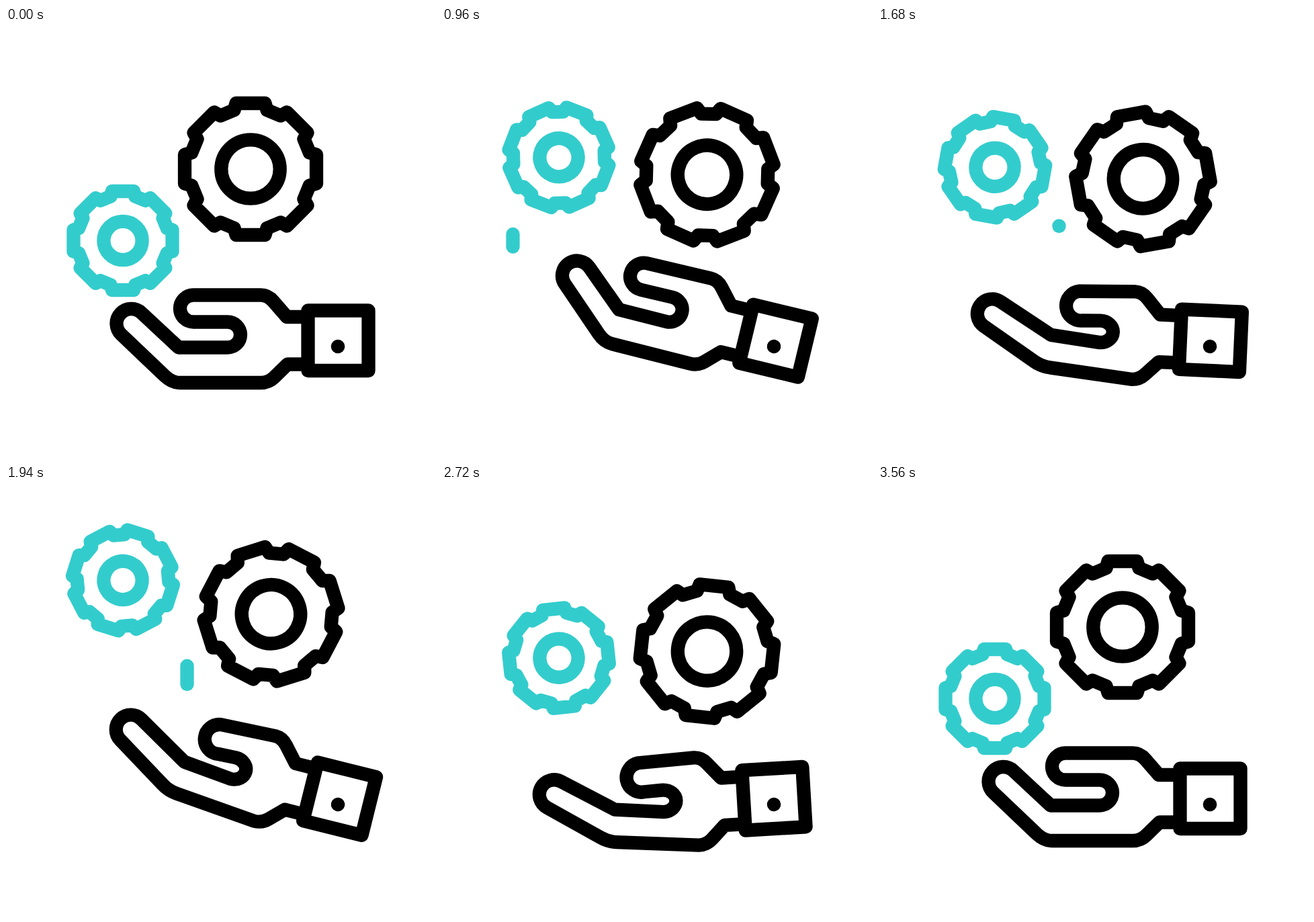
Recreate the animation shown at these times as an HTML page. Size 640x640 px, loop 3.6 s.

```html
<!DOCTYPE html>
<html lang="en">
<head>
<meta charset="utf-8">
<title>Hand and gears</title>
<style>
  html, body { margin: 0; width: 100%; height: 100%; overflow: hidden; background: #fff; }
  svg { display: block; width: 100vw; height: 100vh; }
  .line { fill: none; stroke: #000; stroke-width: 20.3; stroke-linejoin: round; }
  .cyan { stroke: #33cccc; }
  .streak { stroke-linecap: round; }
</style>
</head>
<body>
<svg viewBox="0 0 640 640">
  <g id="big" class="line">
    <path/><circle r="43.7"/>
  </g>
  <g id="small" class="line cyan">
    <path/><circle r="28.6"/>
  </g>
  <path id="streakA" class="line cyan streak"/>
  <path id="streakB" class="line cyan streak"/>
  <g id="arm" class="line">
    <path id="hand"/>
    <rect x="449.5" y="420.5" width="90" height="89.5"/>
    <circle cx="494" cy="474" r="10.3" fill="#000" stroke="none"/>
  </g>
</svg>
<script>
const LOOP = 3600;
const $ = id => document.getElementById(id);
const mix = (a, b, k) => a + (b - a) * k;
const ramp = (t, from, to) => Math.min(1, Math.max(0, (t - from) / (to - from)));
const ease = (t, from, to) => (1 - Math.cos(Math.PI * ramp(t, from, to))) / 2;

// Rest, then three tosses (top, bottom, top ...), then rest; the tops hang briefly.
const HANG = 40;
function toss(times, values) {
  return t => values.reduce((v, next, i) => {
    const from = times[i - 1] + (i % 2 ? 0 : HANG);
    return mix(v, next, ease(t, from, times[i]));
  });
}

const gearTimes = [200, 800, 1430, 1960, 2620, 3100, 3560];
const smallY = toss(gearTimes, [316.5, 185, 263.5, 140, 267, 162, 316.5]);
const bigY = toss(gearTimes, [210, 214.5, 253.5, 190.5, 251, 203, 210]);
const tilt = toss([200, 870, 1430, 1960, 2560, 3100, 3440], [0, 14, -7, 14, -6, 7, 0]);
const bigX = t => 364 + 30.5 * (ease(t, 200, 640) - ease(t, 3140, 3520));
const spin = t => 180 * (ramp(t, 200, 1400) + ramp(t, 1440, 2680)) + 135 * ramp(t, 2680, 3560);
const opening = t => ease(t, 850, 1360) - ease(t, 2660, 3400);

// The fingers stretch out and the thumb draws back as the hand opens.
function handPath(open) {
  const m = (a, b) => mix(a, b, open);
  const thumbX = m(279, 296.5), thumbY = m(417.5, 420.5), lip = m(437.5, 443);
  const tipX = m(186.5, 168), tipY = 440, angle = m(43, 32) * Math.PI / 180;
  const nx = 22 * Math.sin(angle), ny = 22 * Math.cos(angle);
  return `M449.5 430H418L398 407Q390 397.5 379 397.5
    L${thumbX} ${thumbY - 20}A20 20 0 0 0 ${thumbX + 6 * open} ${m(437.5, 444)}
    L330 ${lip}A19 ${(475.5 - lip) / 2} 0 0 1 330 475.5
    L257 ${m(475.5, 467.5)}L${tipX + nx} ${tipY - ny}A22 22 0 0 0 ${tipX - nx} ${tipY + ny}
    L${m(236.5, 234)} ${m(518, 508)}Q${m(247, 244)} ${m(528, 514.5)} ${m(259, 257)} ${m(528, 516)}
    L379 528Q391 528 399 520L419 500.5H449.5`;
}

function gearPath(size) {
  const tooth = [[-24.5, -87.8], [-21.5, -98], [21.5, -98], [24.5, -87.8]];
  const points = [];
  for (let k = 0; k < 8; k++) {
    const c = size * Math.cos(k * Math.PI / 4), s = size * Math.sin(k * Math.PI / 4);
    for (const [x, y] of tooth) points.push([x * c - y * s, x * s + y * c]);
  }
  return 'M' + points.join('L') + 'Z';
}

function place(id, x, y, angle) {
  $(id).setAttribute('transform', `translate(${x} ${y}) rotate(${angle})`);
}

// A vertical dash that grows upwards, then is wiped from below.
function streak(id, x, y, t, start) {
  const head = ramp(t, start, start + 300), tail = ramp(t, start + 385, start + 685);
  const shown = head > 0 && tail < 1;
  $(id).setAttribute('d', shown ? `M${x} ${y - 31 * tail}L${x} ${y - 31 * head - 0.01}` : '');
}

function draw(t) {
  place('big', bigX(t), bigY(t), spin(t));
  place('small', 174, smallY(t), -spin(t));
  streak('streakA', 105.5, 338, t, 455);
  streak('streakB', 269.5, 295, t, 1675);
  $('arm').setAttribute('transform', `rotate(${tilt(t)} 494 474)`);
  $('hand').setAttribute('d', handPath(opening(t)));
}

$('big').firstElementChild.setAttribute('d', gearPath(1));
$('small').firstElementChild.setAttribute('d', gearPath(0.75));

let begin;
function frame(now) {
  begin ??= now;
  draw((now - begin) % LOOP);
  requestAnimationFrame(frame);
}
draw(0);
requestAnimationFrame(frame);
</script>
</body>
</html>
```
